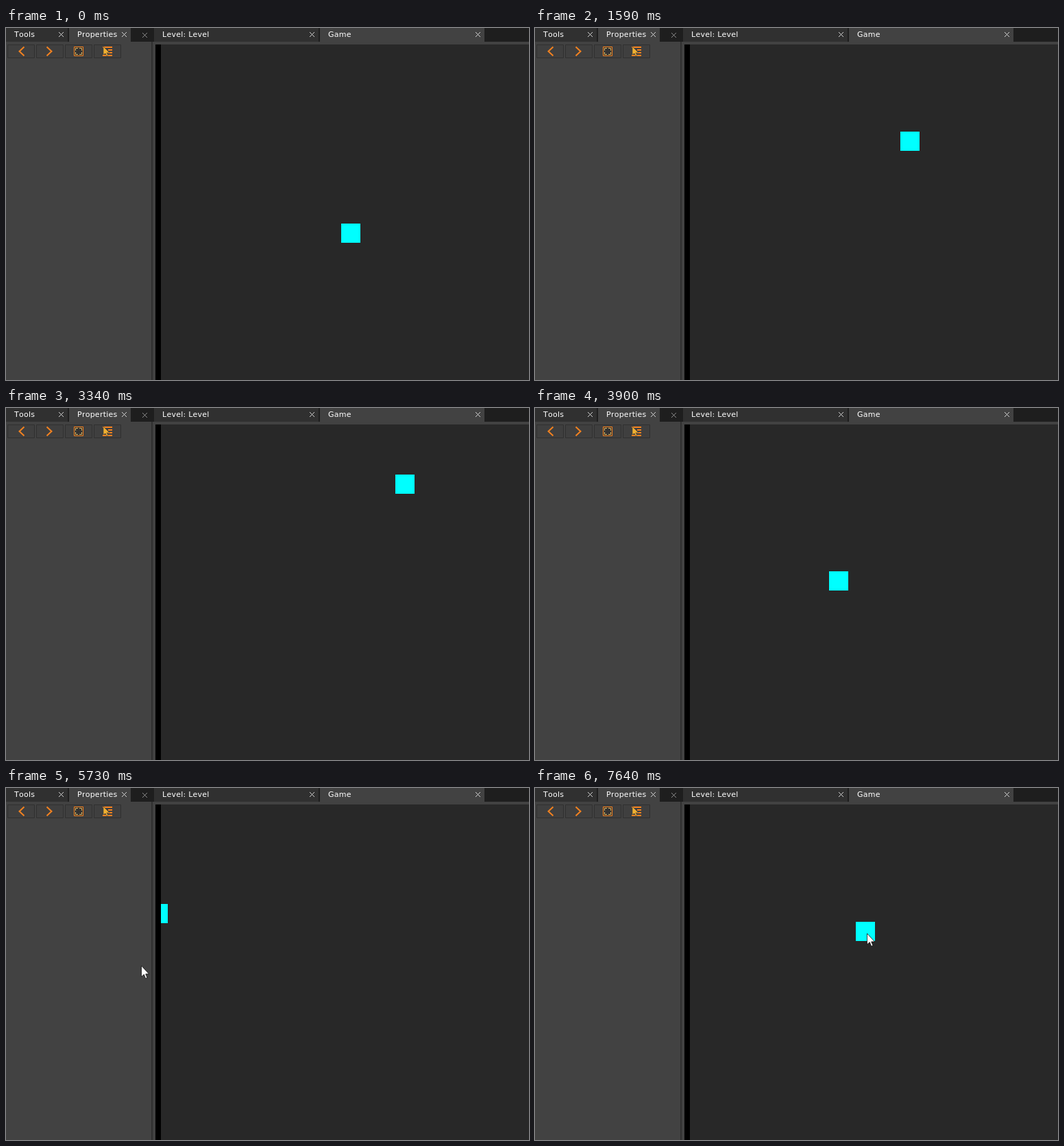
An HTML page for the animation above (8.11 s loop, 763 by 513 pixels).

```html
<!DOCTYPE html>
<html lang="en">
<head>
<meta charset="utf-8">
<title>Square following the mouse</title>
<style>
html, body { margin: 0; width: 100%; height: 100%; overflow: hidden; background: #424242; }
svg { display: block; }
text { font: 11px "DejaVu Sans", sans-serif; font-kerning: none; letter-spacing: .25px; fill: #fff; }
.btn { fill: #3f3f3f; stroke: #303030; }
.line { fill: none; stroke: #f58220; stroke-width: 2; }
.thin { fill: #333; stroke: #f58220; }
.close { fill: none; stroke: #d4d4d4; }
.pointer { fill: #fff; stroke: #111; stroke-width: .8; }
</style>
</head>
<body>
<svg width="763" height="513" viewBox="0 0 763 513">
  <defs>
    <path id="x" d="M-3.5 -3.5l7 7m0 -7l-7 7"/>
    <clipPath id="game"><path d="M226 24H763V513H226z"/></clipPath>
  </defs>

  <!-- tabs -->
  <path fill="#1e1e1e" d="M0 0H763V20H0z"/>
  <path fill="#303030" d="M0 0H90V20H0zM216 0H456V20H216z"/>
  <path fill="#424242" d="M92 0H182V20H92zM458 0H698V20H458z"/>
  <text x="12" y="13">Tools</text>
  <text x="104" y="13">Properties</text>
  <text x="228" y="13">Level: Level</text>
  <text x="470" y="13">Game</text>
  <g class="close">
    <use href="#x" x="80.5" y="9.5"/>
    <use href="#x" x="172.5" y="9.5"/>
    <use href="#x" x="202.5" y="10.5" opacity=".6"/>
    <use href="#x" x="446.5" y="9.5"/>
    <use href="#x" x="688.5" y="9.5"/>
  </g>

  <!-- toolbar -->
  <path class="btn" d="M2.5 24.5h39v19h-39zm42 0h39v19h-39zm42 0h39v19h-39zm42 0h39v19h-39z"/>
  <path class="line" d="M26.5 27.5l-7 6.5 7 6.5M59.5 27.5l7 6.5-7 6.5"/>
  <path class="thin" d="M99.5 27.5h13v13h-13z"/>
  <path fill="none" stroke="#e0b860" d="M101.5 33v-3.5h3.5m2 0h3.5v3.5m0 2v3.5h-3.5m-2 0h-3.5v-3.5"/>
  <path class="line" d="M141 28h14M149 32h6M148 36h7M141 40h14"/>
  <path fill="#f0b030" stroke="#3f3f3f" stroke-width=".6" d="M142 27v12l3-2 2 4 2-1-2-4h4z"/>

  <!-- splitter and game view -->
  <path fill="#303030" d="M212 20h2v493h-2z"/>
  <path fill="#000" d="M218 24h8v489h-8z"/>
  <path fill="#282828" d="M226 24h537v489h-537z"/>
  <g clip-path="url(#game)"><rect id="box" x="-14" y="-14" width="28" height="28" fill="#0ff"/></g>

  <path id="arrow" class="pointer" d="M-.5 0V16L3.3 12.7 5.6 18.6 8 17.6 5.7 12H10.5z"/>
  <path id="resize" class="pointer" d="M-10 0l5-4v3h10v-3l5 4-5 4v-3h-10v3z"/>
</svg>
<script>
// Mouse path as [step, x, y]; the box runs along it a little behind
const path = [
  [0, 503, 299], [4, 395, 317], [6, 325, 278], [9, 294, 212], [11, 322, 172],
  [13, 395, 153], [15, 547, 165], [17, 600, 202], [22, 470, 215], [27, 405, 317],
  [30, 571, 393], [33, 711, 346], [37, 582, 111], [41, 461, 199], [45, 428, 257],
  [51, 222, 183], [53.8, 87, 162], [57.8, 52, 255], [61.8, 100, 329], [68.8, 217, 251],
  [73, 325, 277], [78, 455, 329], [81, 592, 306], [85, 580, 205], [88, 485, 177],
  [91, 482, 209], [92, 486, 212]
];
const loop = 8110, hold = 463, stepTime = 79.67, last = 91;
const lead = .8;                 // steps from box to mouse
const leave = 51, back = 69;     // the box waits while the mouse is away
const splitter = 216;
const [box, arrow, resize] = ["box", "arrow", "resize"].map(id => document.getElementById(id));

// Smooth curve through the points
function at(n) {
  const end = path.length - 1;
  const i = Math.max(0, Math.min(end, path.findIndex(p => p[0] > n)) - 1);
  const a = path[i], b = path[i + 1], span = b[0] - a[0], u = (n - a[0]) / span;
  const slope = (k, c) => {
    const p = path[Math.max(k - 1, 0)], q = path[Math.min(k + 1, end)];
    return (q[c] - p[c]) / (q[0] - p[0]) * span;
  };
  return [1, 2].map(c => Math.round(
    a[c] + (b[c] - a[c]) * u * u * (3 - 2 * u) +
    slope(i, c) * u * (1 - u) ** 2 - slope(i + 1, c) * u * u * (1 - u)));
}

function place(el, [x, y], shown = true) {
  el.setAttribute("transform", `translate(${x} ${y})`);
  el.setAttribute("visibility", shown ? "visible" : "hidden");
}

function draw(now) {
  const t = now % loop;
  const n = Math.max(0, Math.min(last, 1 + Math.floor((t - hold) / stepTime)));
  const mouse = at(n + lead);
  const seen = n >= leave - 1;
  const onSplitter = Math.abs(mouse[0] - splitter) < 16;
  place(box, at(n > leave && n < back ? leave : n));
  place(arrow, mouse, seen && !onSplitter);
  place(resize, mouse, seen && onSplitter);
}

const start = performance.now();
function tick() {
  draw(performance.now() - start);
  requestAnimationFrame(tick);
}
tick();
</script>
</body>
</html>
```
